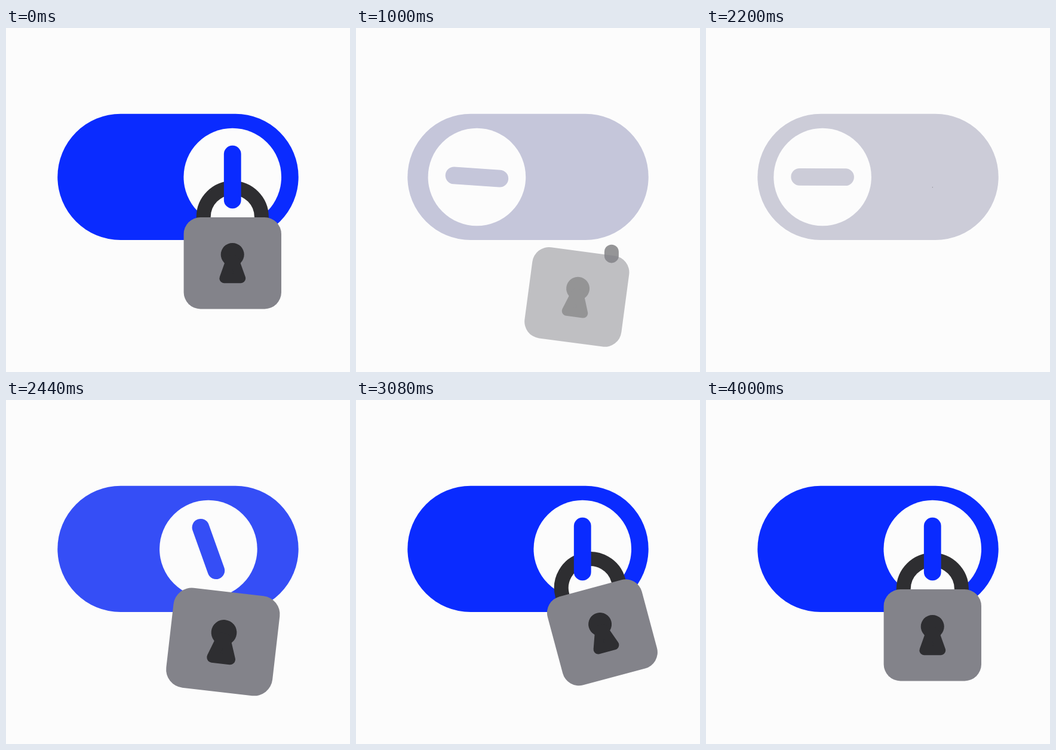
An HTML page for the animation above (4.04 s loop, 576 by 576 pixels).

```html
<!DOCTYPE html>
<html lang="en">
<head>
<meta charset="utf-8">
<title>Locked toggle</title>
<style>
  html, body { margin: 0; width: 100%; height: 100%; overflow: hidden; background: #fcfcfc; }
  svg { display: block; width: 100vw; height: 100vh; }
</style>
</head>
<body>
<svg viewBox="0 0 576 576">
  <rect id="track" x="86.3" y="143.8" width="403.4" height="211.2" rx="105.6"/>
  <circle id="knob" cy="249.5" r="81.8" fill="#fcfcfc"/>
  <path id="shackle" d="M427.9 324V316.5A48.6 48.6 0 0 0 330.7 316.5V324" pathLength="1"
        fill="none" stroke="#2e2e31" stroke-width="24" stroke-linecap="round"/>
  <rect id="bar" x="-14.4" y="-52.8" width="28.8" height="105.6" rx="14.4"/>
  <g id="body">
    <rect x="297.6" y="317" width="163.4" height="153.4" rx="28" fill="#83838a"/>
    <g fill="#2e2e31">
      <circle cx="379.2" cy="379.4" r="19.5"/>
      <path d="M376.5 388L365.4 419.2H393.2L382 388Z" stroke="#2e2e31" stroke-width="16" stroke-linejoin="round"/>
    </g>
  </g>
</svg>
<script>
const LOOP = 4040, STEP = 40;
const CX = 379.25, HANG = 266, OFF_X = 194.5;
const BLUE = [10, 43, 255], GREY = [205, 205, 216];

const smooth = t => t * t * (3 - 2 * t);
const sineOut = t => Math.sin(t * Math.PI / 2);
const quadOut = t => 1 - (1 - t) ** 2;
const linear = t => t;
const mix = (a, b, p) => a + (b - a) * p;

const ramp = (t, from, to, ease = smooth) =>
  ease(Math.min(1, Math.max(0, (t - from) / (to - from))));

// Eased value between [time, value] keys
function track(t, keys) {
  let v = keys[0][1];
  for (let i = 1; i < keys.length; i++) {
    v = mix(v, keys[i][1], ramp(t, keys[i - 1][0], keys[i][0]));
  }
  return v;
}

const SWITCH = [[684, 0], [1045, 1], [2188, 1], [2549, 0]];
const SWING = [[2188, 0], [2549, 8.4], [3035, -15.8], [3520, 16], [4000, 0]];
const SIZE = [[2188, 0], [2450, 1.1], [2549, 1.1], [2909, 1]];

const el = id => document.getElementById(id);
const set = (id, attrs) => {
  for (const key in attrs) el(id).setAttribute(key, attrs[key]);
};

function drawToggle(t) {
  const off = track(t, SWITCH);
  const x = mix(CX, OFF_X, off);
  const fill = `rgb(${BLUE.map((c, i) => Math.round(mix(c, GREY[i], off)))})`;
  set('track', { fill });
  set('knob', { cx: x });
  set('bar', { fill, transform: `translate(${x} 249.5) rotate(${-90 * off})` });
}

function drawLock(t) {
  let shackle, body, drawn, opacity;
  if (t < 2188) {
    const fall = ramp(t, 684, 1045, sineOut);
    shackle = `translate(0 ${58.5 * fall})`;
    body = `${shackle} rotate(${7.75 * fall} ${CX} 322)`;
    drawn = 1 - ramp(t, 680, 1080, quadOut);
    opacity = 1 - ramp(t, 840, 1160, linear);
  } else {
    shackle = body = `translate(${CX} ${HANG}) rotate(${track(t, SWING)}) ` +
      `scale(${track(t, SIZE)}) translate(${-CX} ${-HANG})`;
    drawn = ramp(t, 2549, 2909);
    opacity = 1;
  }
  set('shackle', {
    transform: shackle,
    opacity: drawn > 0 ? opacity : 0,
    'stroke-dasharray': drawn < 1 ? `${drawn} 2` : 'none'
  });
  set('body', { transform: body, opacity });
}

let start;
function frame(now) {
  start ??= now;
  const t = Math.floor(((now - start) % LOOP) / STEP) * STEP;
  drawToggle(t);
  drawLock(t);
  requestAnimationFrame(frame);
}
drawToggle(0);
drawLock(0);
requestAnimationFrame(frame);
</script>
</body>
</html>
```
